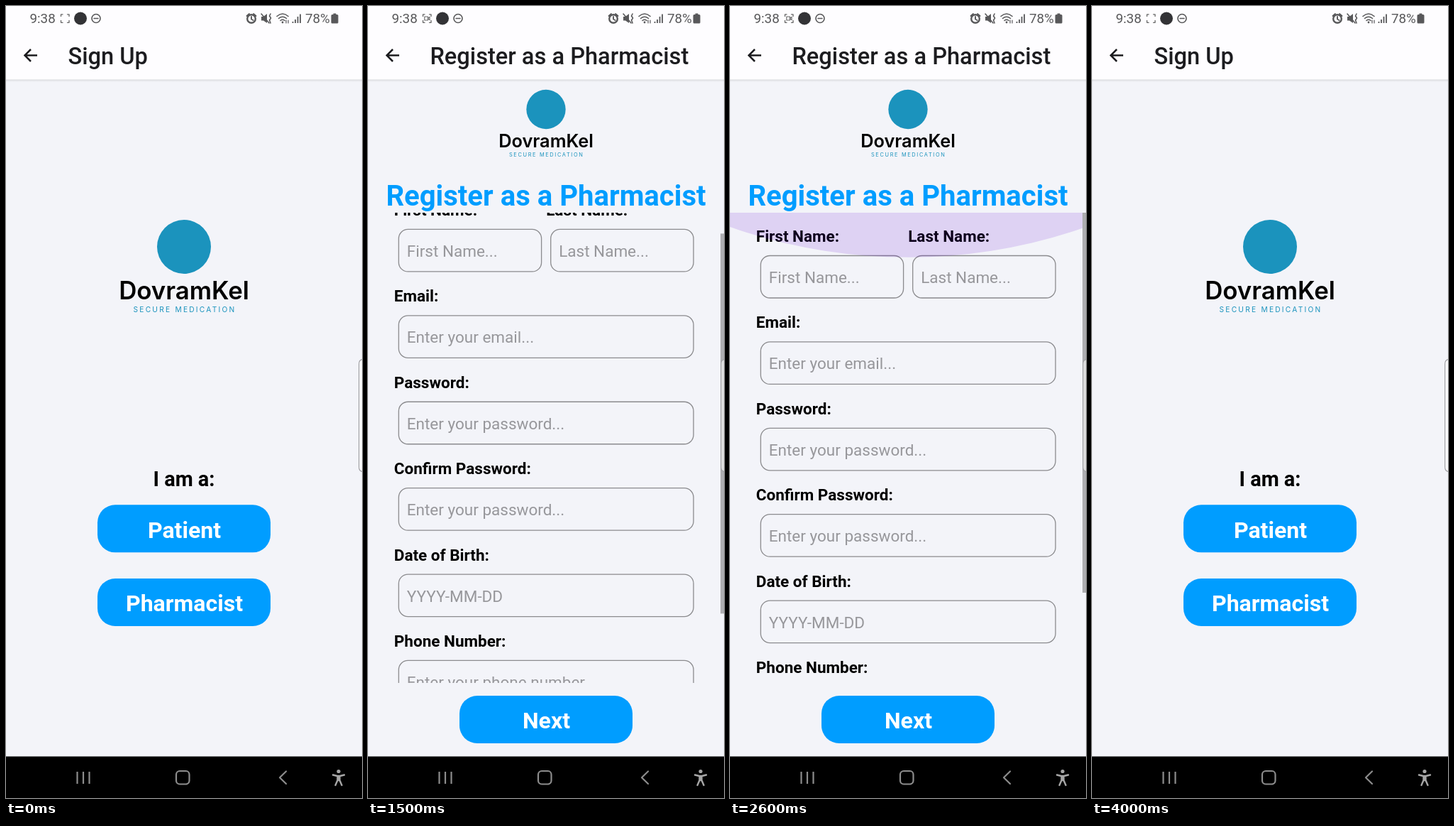
An HTML page for the animation above (4200 ms loop, 502 by 1115 pixels).

```html
<!DOCTYPE html>
<html lang="en">
<head>
<meta charset="utf-8">
<title>Sign up flow</title>
<style>
  html, body { margin: 0; width: 100%; height: 100%; overflow: hidden; background: #f3f4f9; }
  svg { display: block; width: 100vw; height: 100vh; font-family: Roboto, sans-serif; }
  .bold { font-weight: 700; }
  .mid { text-anchor: middle; }
  .inter { font-family: Inter, sans-serif; }
  .title { font-size: 32.6px; font-weight: 500; fill: #1c1c1f; }
  .label { font-size: 22.5px; font-weight: 700; }
  .hint { font-size: 22.5px; fill: #97979b; }
  .field { fill: none; stroke: #8b8b8e; stroke-width: 1.3; }
  .button { font-size: 32.1px; font-weight: 700; fill: #fff; text-anchor: middle; }
  .status { font-size: 18.8px; fill: #58585a; }
  .line { fill: none; stroke-linecap: round; stroke-linejoin: round; }
</style>
</head>
<body>
<svg viewBox="0 0 502 1115" preserveAspectRatio="none">
  <defs>
    <linearGradient id="shade" x1="0" y1="0" x2="0" y2="1">
      <stop offset="0" stop-color="#d6d7da"/>
      <stop offset="1" stop-color="#f3f4f9"/>
    </linearGradient>
    <clipPath id="view"><rect y="291" width="502" height="662"/></clipPath>
    <g id="frame">
      <rect width="502" height="1056" fill="#f3f4f9"/>
      <rect y="103" width="502" height="4" fill="url(#shade)"/>
      <rect width="502" height="103.5" fill="#fefdff"/>
      <path d="M44 69.5H26.5M35 61L26.5 69.5L35 78" fill="none" stroke="#1c1c1f" stroke-width="2.5"/>
    </g>
    <g id="brand" class="mid inter">
      <circle r="38" fill="#1b93bd"/>
      <text y="74" font-size="34.8" font-weight="600">DovramKel</text>
      <text x="1" y="91.5" font-size="10.2" letter-spacing="2.25" fill="#1b93bd">SECURE MEDICATION</text>
    </g>
    <rect id="pill" x="129" width="244" height="67" rx="25" fill="#009dff"/>
    <circle id="arc" cx="251" cy="-521.4" r="602" fill="#5a00ca"/>
  </defs>

  <g id="signup">
    <use href="#frame"/>
    <text class="title" x="87.5" y="82">Sign Up</text>
    <use href="#brand" transform="translate(251 339)"/>
    <text class="bold mid" x="251" y="676" font-size="28.9">I am a:</text>
    <use href="#pill" y="702.3"/>
    <text class="button" x="251.5" y="748.5">Patient</text>
    <use class="pressed" href="#pill" y="806"/>
    <text class="button pressed" x="251.5" y="852.3">Pharmacist</text>
  </g>

  <g id="register">
    <use href="#frame"/>
    <text class="title" x="87.5" y="82">Register as a Pharmacist</text>
    <use href="#brand" transform="translate(251 145.5) scale(.728)"/>
    <text class="bold mid" x="251" y="280.5" font-size="40.1" fill="#009dff">Register as a Pharmacist</text>
    <g clip-path="url(#view)">
      <g id="form"></g>
      <use id="topGlow" href="#arc"/>
      <use id="bottomGlow" href="#arc"/>
    </g>
    <rect id="thumb" x="497" width="5" height="535" fill="#adadb0"/>
    <use href="#pill" y="971"/>
    <text class="button" x="251.5" y="1017">Next</text>
  </g>

  <path d="M503 497.5Q497.7 498 497.7 504V649Q497.7 655 503 655.5Z" fill="#fff" fill-opacity=".6" stroke="#a2a2a5" stroke-width="1.2"/>

  <g id="statusBar">
    <text class="status" x="33.5" y="24.3">9:38</text>
    <path class="line" d="M80 11.8H77.5V14.5M86.5 11.8H89V14.5M77.5 20.5V23.3H80M89 20.5V23.3H86.5" stroke="#666" stroke-width="1.3"/>
    <path id="camera" class="line" d="M79.8 15H84.4V20H79.8ZM84.4 17.2L87 15.4V19.6L84.4 17.8" stroke="#666" stroke-width="1.1"/>
    <circle cx="105" cy="17.5" r="9" fill="#333336"/>
    <g class="line" stroke="#58585a" stroke-width="1.6">
      <circle cx="127" cy="17.5" r="6"/>
      <path d="M124 17.5H130"/>
      <circle cx="346" cy="18" r="5.8" stroke-width="2.4"/>
      <path d="M346 15V18.5L348.5 20M339.5 14L343 11M352.5 14L349 11" stroke-width="1.9"/>
      <path d="M360 11L371 24M373 11L371.5 14L373.5 17L371.5 20L373 24"/>
      <path d="M382 14.5Q390 7.5 398 14.5M384.5 17.5Q390 13 395.5 17.5M387 20.5Q390 18 393 20.5"/>
      <path d="M395 20V24M398 20V24" stroke-width="1.2"/>
      <path d="M404.5 22V24M408 19V24M411.5 15V24M415 11.5V24" stroke-width="1.8" stroke-linecap="butt"/>
    </g>
    <path d="M360 15H363L368 11V24L363 20.5H360Z" fill="#58585a"/>
    <circle cx="390" cy="23" r="1.4" fill="#58585a"/>
    <text class="status" x="422" y="24.3">78%</text>
    <path d="M461.5 10.5H465.5V12H467Q468.5 12 468.5 13.5V23Q468.5 24.5 467 24.5H460Q458.5 24.5 458.5 23V13.5Q458.5 12 460 12H461.5Z" fill="#58585a"/>
  </g>

  <g id="navBar">
    <rect y="1056.5" width="502" height="59" fill="#000"/>
    <g class="line" stroke="#8d8d8d" stroke-width="2.2">
      <path d="M100.5 1078V1095M109 1078V1095M117.5 1078V1095" stroke-linecap="butt"/>
      <rect x="240" y="1077" width="18.5" height="18.5" rx="5"/>
      <path d="M395 1077.5L386 1086.2L395 1095"/>
    </g>
    <g class="line" stroke="#a6a6a6" stroke-width="2.4">
      <circle cx="469" cy="1077.5" r="2.6" fill="#a6a6a6" stroke="none"/>
      <path d="M461 1082.5L467 1084H471L477 1082.5M467.5 1084V1090L464.5 1097M470.5 1084V1090L473.5 1097M469 1084V1090"/>
    </g>
  </g>
</svg>
<script>
const LOOP = 4200, STEP = 100;
const VIEW_TOP = 291, VIEW_BOTTOM = 953, CARD_MID = 527.5;
const ROW = 121.4, SCROLL_MAX = 160, THUMB_TRAVEL = 127;
const OPEN = 820, CLOSE = 3390, SLIDE = 400;
const $ = id => document.getElementById(id);

const clamp = x => Math.min(1, Math.max(0, x));
const ramp = (t, from, to) => clamp((t - from) / (to - from));
const smooth = x => x * x * (3 - 2 * x);

// Cubic bezier (.35, .45, 0, 1), solved for time by bisection.
function glide(x) {
  const curve = (a, b, s) => 3 * a * s * (1 - s) ** 2 + 3 * b * s * s * (1 - s) + s ** 3;
  let low = 0, high = 1;
  for (let i = 0; i < 20; i++) {
    const s = (low + high) / 2;
    if (curve(.35, 0, s) < x) low = s; else high = s;
  }
  return curve(.45, 1, low);
}

function buildForm() {
  const top = 332, left = 43.3, full = 415.7;
  const entry = (x, row, width, label, hint) => {
    const y = top + row * ROW;
    return `
      <text class="label" x="${x - 6.5}" y="${y}">${label}</text>
      <rect class="field" x="${x}" y="${y + 19.5}" width="${width}" height="59.5" rx="13"/>
      <text class="hint" x="${x + 11.5}" y="${y + 58}">${hint}</text>`;
  };
  const wide = [
    ['Email:', 'Enter your email...'],
    ['Password:', 'Enter your password...'],
    ['Confirm Password:', 'Enter your password...'],
    ['Date of Birth:', 'YYYY-MM-DD'],
    ['Phone Number:', 'Enter your phone number...']
  ];
  const last = top + (wide.length + 1) * ROW;
  $('form').innerHTML =
    entry(left, 0, 201.3, 'First Name:', 'First Name...') +
    entry(257.7, 0, 201.3, 'Last Name:', 'Last Name...') +
    wide.map(([label, hint], i) => entry(left, i + 1, full, label, hint)).join('') + `
    <text class="label" x="36.8" y="${last}">Location:</text>
    <g transform="translate(55 ${last + 29})">
      <path d="M0 20.5C-4 12-11.5 7-11.5 0A11.5 11.5 0 0 1 11.5 0C11.5 7 4 12 0 20.5Z" fill="#009dff"/>
      <circle r="4.3" fill="#f3f4f9"/>
    </g>
    <text x="73" y="${last + 41.5}" font-size="22.5">Choose on Map</text>`;
}

function setCard(id, scale, opacity) {
  $(id).setAttribute('opacity', opacity);
  $(id).setAttribute('transform',
    `translate(251 ${CARD_MID}) scale(${scale}) translate(-251 ${-CARD_MID})`);
}

function setGlow(id, edge, direction, depth) {
  $(id).setAttribute('transform', `translate(0 ${edge}) scale(1 ${direction * depth})`);
  $(id).setAttribute('opacity', .18 * depth);
}

function renderCards(t) {
  const closing = t >= CLOSE;
  const shown = closing ? 1 - glide(ramp(t, CLOSE, CLOSE + SLIDE)) : glide(ramp(t, OPEN, OPEN + SLIDE));
  const smallest = closing ? .925 : .85;
  setCard('signup', 1 + .075 * shown, 1);
  setCard('register', smallest + (1 - smallest) * shown, ramp(shown, .75, .875));

  const press = t < 700 ? 1 : .2 + .8 * ramp(t, 840, 1090);
  document.querySelectorAll('.pressed').forEach(part => part.setAttribute('opacity', press));
}

function renderForm(t) {
  const down = 1 - (1 - ramp(t, 1400, 1900)) ** 1.18;
  const up = smooth(ramp(t, 2000, 2300));
  const scroll = SCROLL_MAX * (down - up) + 5 * ramp(t, 2600, 2800);
  $('form').setAttribute('transform', `translate(0 ${-scroll})`);
  $('thumb').setAttribute('y', VIEW_TOP + THUMB_TRAVEL * scroll / SCROLL_MAX);
  $('thumb').setAttribute('opacity', t < 1500 ? 0 : 1 - ramp(t, 2800, 3100));
  setGlow('bottomGlow', VIEW_BOTTOM, -1, .48 * (ramp(t, 1700, 1900) - ramp(t, 1900, 2100)));
  setGlow('topGlow', VIEW_TOP, 1, .87 * (ramp(t, 2200, 2300) - smooth(ramp(t, 2500, 3000))));
}

function render(now) {
  const t = Math.floor(now % LOOP / STEP) * STEP;
  renderCards(t);
  renderForm(t);
  $('camera').setAttribute('opacity', Math.floor(t / 500) % 2);
}

function tick() {
  render(performance.now());
  requestAnimationFrame(tick);
}

buildForm();
tick();
</script>
</body>
</html>
```
